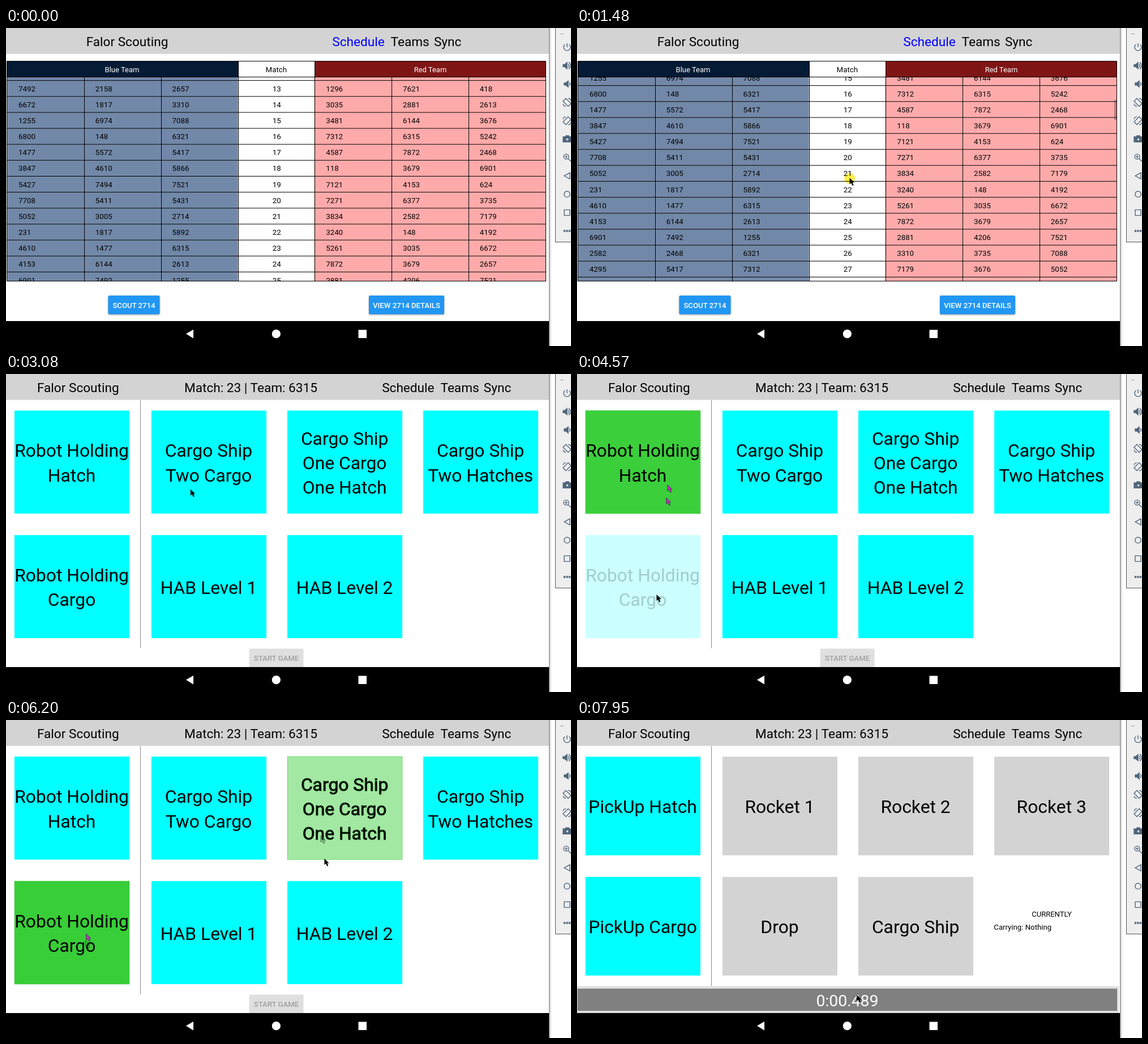
Write an HTML page that moves like this. It is 998 by 561 pixels and loops after 8 s.

```html
<!DOCTYPE html>
<html lang="en">
<head>
<meta charset="utf-8">
<title>Scouting app</title>
<style>
html, body { margin: 0; width: 100%; height: 100%; overflow: hidden; background: #fff; }
svg { display: block; width: 998px; height: 561px; font-family: Roboto, sans-serif; }
text { white-space: pre; }
.lift { filter: drop-shadow(0 1.5px 1.5px rgba(0, 0, 0, .4)); }
</style>
</head>
<body>
<svg id="stage" viewBox="0 0 998 561"></svg>
<script>
const DURATION = 8000;
const AQUA = '#00ffff', LIME = '#32cd32', GRAY = '#d3d3d3', BLUE = '#2196f3';
const MID = { 'text-anchor': 'middle' };
const stage = document.getElementById('stage');

function set(node, attrs) {
  for (const key in attrs) node.setAttribute(key, attrs[key]);
}
function el(parent, tag, attrs = {}) {
  const node = document.createElementNS('http://www.w3.org/2000/svg', tag);
  set(node, attrs);
  parent.append(node);
  return node;
}
const group = (parent, attrs) => el(parent, 'g', attrs);
const rect = (parent, x, y, width, height, fill, attrs) =>
  el(parent, 'rect', { x, y, width, height, fill, ...attrs });
const path = (parent, d, attrs) => el(parent, 'path', { d, ...attrs });
const show = (node, on) => set(node, { visibility: on ? 'visible' : 'hidden' });
const clamp = (v, max = 1) => Math.max(0, Math.min(max, v));

// y is the middle of the capitals
function label(parent, x, y, size, str, attrs) {
  const node = el(parent, 'text', { x, y: y + size * .356, 'font-size': size, ...attrs });
  node.textContent = str;
  return node;
}

function appBar(parent, titleX, menuX, info) {
  rect(parent, 0, 0, 959, 45.7, GRAY);
  label(parent, titleX, 24, 22.6, 'Falor Scouting', MID);
  if (info) label(parent, 432.5, 24, 22.6, info, MID);
  label(parent, menuX, 24, 22.6, 'Schedule', { fill: info ? '#000' : '#0000ff' });
  label(parent, menuX + 103.3, 24, 22.6, 'Teams');
  label(parent, menuX + 179.6, 24, 22.6, 'Sync');
}

function button(parent, x, y, w, h, str) {
  const back = rect(parent, x, y, w, h, BLUE, { rx: 2, class: 'lift' });
  const text = label(parent, x + w / 2, y + h / 2 + .5, 13.2, str, { ...MID, fill: '#fff', 'font-weight': 500 });
  return { back, text };
}

// Schedule screen: three blue teams and three red teams per match
const FIRST = 13, PITCH = 28.15;
const MATCHES = `7492 2158 2657 1296 7621 418
6672 1817 3310 3035 2881 2613
1255 6974 7088 3481 6144 3676
6800 148 6321 7312 6315 5242
1477 5572 5417 4587 7872 2468
3847 4610 5866 118 3679 6901
5427 7494 7521 7121 4153 624
7708 5411 5431 7271 6377 3735
5052 3005 2714 3834 2582 7179
231 1817 5892 3240 148 4192
4610 1477 6315 5261 3035 6672
4153 6144 2613 7872 3679 2657
6901 7492 1255 2881 4206 7521
2582 2468 6321 3310 3735 7088
4295 5417 7312 7179 3676 5052
7271 6974 118 5572 2158 7494
3834 4192 624 4063 7708 4587
5431 6800 418 2714 4378 3481
7121 3847 5414 231 3005 1296`.split('\n').map(line => line.split(' '));

const colX = i => 2.7 + i * 135.8;
const edge = i => Math.floor(colX(i)) + .5;

const schedule = group(stage);
appBar(schedule, 214, 576.3);
rect(el(stage, 'clipPath', { id: 'pane' }), 1, 87, 953, 359);
const pane = group(schedule, { 'clip-path': 'url(#pane)' });
const rows = group(pane);
let pressedCell;

function addRow(match, values) {
  const top = 92.6 + (match - FIRST) * PITCH;
  const cells = values ? [...values.slice(0, 3), match, ...values.slice(3)] : Array(7).fill('');
  cells.forEach((str, i) => {
    const cell = group(rows);
    const fill = i < 3 ? '#7288a8' : i > 3 ? '#ffaaaa' : '#fff';
    rect(cell, edge(i) - 1, top, edge(i + 1) - edge(i) + 1, PITCH, fill);
    if (i === 3) label(cell, 478.3, top + 14.4, 13.3, str, MID);
    else label(cell, colX(i) + 19.3, top + 14.4, 13.3, str);
    if (match === 23 && i === 2) pressedCell = cell;
  });
  path(rows, `M1 ${top}H954`, { stroke: '#000' });
}
addRow(FIRST - 1);
MATCHES.forEach((values, i) => addRow(FIRST + i, values));
addRow(FIRST + MATCHES.length);
for (let i = 1; i < 7; i++) path(pane, `M${edge(i)} 87V446`, { stroke: '#000' });
const thumb = rect(pane, 949, 0, 4.5, 35, '#000');

rect(schedule, 1.5, 58.5, 409, 28, '#041a35');
rect(schedule, 545.5, 58.5, 408, 28, '#801515');
path(schedule, 'M1.5 58.5H953.5V446.5H1.5ZM1.5 86.5H953.5M410.5 58V87M545.5 58V87', { fill: 'none', stroke: '#000' });
label(schedule, 205, 73, 13, 'Blue Team', { ...MID, fill: '#fff' });
label(schedule, 477.3, 73, 13.3, 'Match', MID);
label(schedule, 749.5, 73, 13, 'Red Team', { ...MID, fill: '#fff' });
button(schedule, 180.5, 472, 91, 33, 'SCOUT 2714');
button(schedule, 641, 472, 133, 33, 'VIEW 2714 DETAILS');

// Tile screens
function tile(parent, col, y, h, fill, str) {
  const x = col ? 16.8 + col * 240.1 : 15, w = 203;
  const back = rect(parent, x, y, w, h, fill);
  const lines = str.split('|');
  const texts = lines.map((line, i) => label(parent, x + w / 2 - .4,
    y + h / 2 + 1.3 + (i - (lines.length - 1) / 2) * 43.2, 31.8, line, MID));
  return { back, texts };
}
function tileScreen(y1, y2, h, bottom) {
  const screen = group(stage);
  appBar(screen, 127.3, 664.2, 'Match: 23 | Team: 6315');
  path(screen, `M237.5 46V${bottom}`, { stroke: '#888' });
  const add = (y, strs, fill) => strs.map((s, i) => tile(screen, i, y, h, i ? fill : AQUA, s));
  return { screen, top: (strs, fill) => add(y1, strs, fill), low: (strs, fill) => add(y2, strs, fill) };
}

const setup = tileScreen(64.5, 284.2, 181.8, 484);
const [hatch, , mixed] = setup.top(
  ['Robot Holding|Hatch', 'Cargo Ship|Two Cargo', 'Cargo Ship|One Cargo|One Hatch', 'Cargo Ship|Two Hatches'], AQUA);
const [cargo] = setup.low(['Robot Holding|Cargo', 'HAB Level 1', 'HAB Level 2'], AQUA);
const start = button(setup.screen, 429.5, 484.5, 96, 33, 'START GAME');

const game = tileScreen(64.7, 276.8, 174, 469);
game.top(['PickUp Hatch', 'Rocket 1', 'Rocket 2', 'Rocket 3'], GRAY);
game.low(['PickUp Cargo', 'Drop', 'Cargo Ship'], GRAY);
label(game.screen, 838.5, 342.5, 13, 'CURRENTLY', MID);
label(game.screen, 736.3, 365.5, 13.2, 'Carrying: Nothing');
rect(game.screen, 0, 469.5, 957, 47.5, '#dedede');
rect(game.screen, 1, 474, 953, 39, '#808080');
label(game.screen, 477.5, 494.5, 28.4, '0:00.489', { ...MID, fill: '#fff' });

// Navigation bar and emulator panel
rect(stage, 0, 517, 959, 44, '#000');
path(stage, 'M318 539.5L331 532V547.5Z', { fill: '#fff' });
el(stage, 'circle', { cx: 477.3, cy: 539.7, r: 7.6, fill: '#fff' });
rect(stage, 622.5, 532.5, 14.5, 14.5, '#fff');
for (let i = 0; i < 5; i++) rect(stage, 959 + i, 0, 1, 561, '#000', { opacity: .46 * .5 ** i });

rect(stage, 970.5, -2, 40, 379.5, '#eeeeee', { stroke: '#555' });
path(stage, 'M979 10.5H985M997 8L999 10', { stroke: '#999' });
const INK = '#50667c';
const PHONE = 'M2 -7L7 -2L-2 7L-7 2ZM-7 -3Q-6 -7 -2 -7M7 3Q6 7 2 7';
const ICONS = [
  ['M0 -7V0M-3.5 -5A6 6 0 1 0 3.5 -5'],
  ['M-7 -2H-4L0 -5.5V5.5L-4 2H-7Z', 'M2 -3Q5 0 2 3M3 -6Q10 0 3 6'],
  ['M-5 -2H-2L2 -5.5V5.5L-2 2H-5Z', 'M4 -3Q7 0 4 3'],
  [PHONE],
  [PHONE],
  ['M-7 -4H-3L-2 -6H3L4 -4H8V5H-7ZM3 .5A2.5 2.5 0 1 0 -2 .5A2.5 2.5 0 1 0 3 .5'],
  ['M-6 -1.5A4.5 4.5 0 1 1 3 -1.5A4.5 4.5 0 1 1 -6 -1.5M2 2L7 7M-4 -1.5H1M-1.5 -4V1'],
  ['M-5 0L5 -5.5V5.5Z'],
  ['M-5.2 0A5.2 5.2 0 1 1 5.2 0A5.2 5.2 0 1 1 -5.2 0'],
  ['M-5 -5H5V5H-5Z'],
  ['M-5.5 -1H-3.5V1H-5.5ZM-1 -1H1V1H-1ZM3.5 -1H5.5V1H3.5Z']
];
const SOLID = [1, 2, 5];
ICONS.forEach((parts, i) => parts.forEach((d, n) => path(stage, d, {
  transform: `translate(991 ${34 + i * 32.4}) scale(${i === 3 ? -1 : 1} 1)`,
  stroke: INK, 'stroke-width': 1.4, 'fill-rule': 'evenodd',
  fill: SOLID.includes(i) && n === 0 ? INK : 'none'
})));

// The list follows the pointer while it is dragged
const DRAG = 1095, REACH = 183, SPEED = .1955;
const scroll = t => clamp((t - DRAG) * SPEED, REACH);

// Glides of the pointer: begin, end, place, bow
const HOME = { x: 600, y: 552 };
const GLIDES = [
  { from: 120, to: 830, x: 490, y: 340 },
  { from: 2200, to: 2600, x: 326, y: 203.5 },
  { from: 3400, to: 3600, x: 160, y: 195.5, bowY: 47 },
  { from: 4200, to: 4520, x: 140.5, y: 389 },
  { from: 4830, to: 5340, x: 556, y: 204 },
  { from: 6150, to: 7160, x: 494, y: 485, bowX: 35 }
];
function pointerAt(t) {
  let { x, y } = HOME;
  GLIDES.forEach((g, i) => {
    const p = 1 - (1 - clamp((t - g.from) / (g.to - g.from))) ** 3;
    const bow = Math.sin(Math.PI * p);
    x += (g.x - x) * p + (g.bowX || 0) * bow;
    y += (g.y - y) * p + (g.bowY || 0) * bow;
    if (i === 0) {
      x -= scroll(t) * .112;
      y -= scroll(t);
    }
  });
  return { x, y };
}
const move = (node, { x, y }) => set(node, { transform: `translate(${x} ${y})` });

// Outlines the pointer leaves on the tiles
const ARROW = 'M0 0V11L2.7 8.8L4.8 13.5L7 12.5L5 8H8.3Z';
const trails = [4200, 4213, 4394, 4830, 6150].map((time, i) => {
  const node = path(stage, ARROW, { fill: i < 3 ? '#c030c0' : 'none', stroke: '#205030', 'stroke-width': .9 });
  move(node, pointerAt(time));
  return { node, from: i === 2 ? 4890 : time, to: i < 2 ? 4640 : 7950 };
});
const halo = el(stage, 'circle', { r: 9.5, cy: 1, fill: '#fff04a', style: 'mix-blend-mode:multiply' });
const pointer = path(stage, ARROW);

// A tapped tile fades out, then comes back green up to the given strength
const HOLD = 180;
function tap({ back, texts }, t, begin, strength, undone = DURATION) {
  const chosen = t >= begin + HOLD && t < undone;
  const alpha = t >= undone ? 1
    : chosen ? .2 + (strength - .2) * clamp((t - begin - HOLD) / 200)
    : 1 - .8 * clamp((t - begin) / 100);
  set(back, { fill: chosen ? LIME : AQUA, 'fill-opacity': alpha, stroke: chosen ? LIME : 'none', 'stroke-opacity': .5 });
  for (const text of texts) {
    set(text, { 'fill-opacity': chosen ? 1 : alpha, stroke: '#0a300a', 'stroke-width': chosen ? 2 * (1 - alpha) : 0 });
  }
}

function draw(t) {
  show(schedule, t < 3080);
  show(setup.screen, t >= 3080 && t < 7950);
  show(game.screen, t >= 7950);

  const offset = scroll(t);
  set(rows, { transform: `translate(0 ${-offset})` });
  set(thumb, { y: 118.6 + offset * .112, opacity: t < 1030 ? 0 : .27 * clamp((2620 - t) / 300) });
  set(pressedCell, { opacity: t >= 2750 ? .3 : 1 });

  tap(hatch, t, 3840, .95, 4640);
  tap(cargo, t, 4450, .97);
  tap(mixed, t, 5790, .45);
  const ready = t > 6260;
  set(start.back, { fill: ready ? BLUE : '#dfdfdf', class: ready ? 'lift' : '' });
  set(start.text, { fill: ready ? '#fff' : '#a1a1a1' });

  const place = pointerAt(t);
  move(pointer, place);
  move(halo, place);
  show(pointer, t >= 120);
  show(halo, t >= 1030 && t < 2110);
  for (const { node, from, to } of trails) show(node, t >= from && t < to);
}

const began = performance.now();
function tick() {
  draw((performance.now() - began) % DURATION);
  requestAnimationFrame(tick);
}
tick();
</script>
</body>
</html>
```
